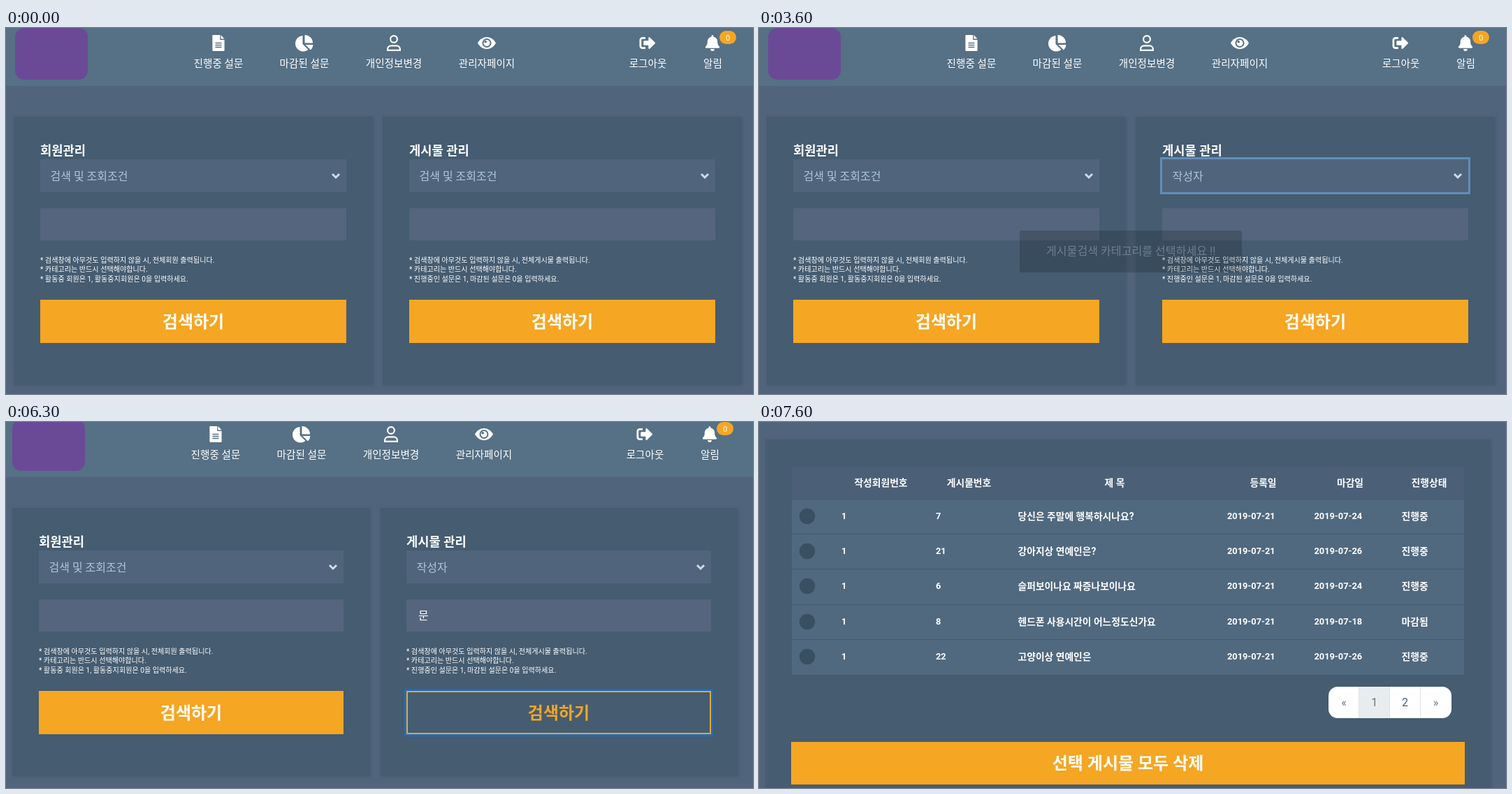
An HTML page for the animation above (8000 ms loop, 1069x524 px).

```html
<!DOCTYPE html>
<html lang="ko">
<head>
<meta charset="utf-8">
<style>
  html, body { margin: 0; width: 100%; height: 100%; overflow: hidden; background: #50647b; }
  svg { display: block; width: 1069px; height: 524px; }
  text { font-family: Roboto, 'Noto Sans CJK KR', 'Noto Sans CJK', sans-serif; white-space: pre; }
</style>
</head>
<body>
<svg id="stage" viewBox="0 0 1069 524"></svg>
<script>
const LOOP = 8000, STEP = 100;
const ORANGE = '#f5a623', PANEL = '#455c71', HEADER = '#567085', FIELD = '#50657b';
const stage = document.getElementById('stage');

const ramp = (t, from, to) => Math.min(1, Math.max(0, (t - from) / (to - from)));
const swing = (t, from, to) => 0.5 - Math.cos(Math.PI * ramp(t, from, to)) / 2;
const within = (t, from, to) => t >= from && t < to;

// Linear interpolation through [time, value] pairs
function track(t, keys) {
  let value = keys[0][1];
  for (let i = 1; i < keys.length; i++) {
    const [t0, v0] = keys[i - 1], [t1, v1] = keys[i];
    if (t >= t0) value = v0 + (v1 - v0) * ramp(t, t0, t1);
  }
  return value;
}

const scrollKeys = [[6200, 0], [6300, 4], [6400, 44], [6500, 124], [6700, 308], [6800, 374],
  [6900, 412], [7000, 424], [7100, 424], [7200, 429], [7300, 458], [7400, 498], [7500, 522], [7600, 530]];

const rect = (x, y, w, h, fill, extra = '') =>
  `<rect x="${x}" y="${y}" width="${w}" height="${h}" fill="${fill}" ${extra}/>`;
const path = (d, extra = 'fill="#fff"') => `<path d="${d}" ${extra}/>`;
const line = (d, width, color = '#fff') => path(d, `fill="none" stroke="${color}" stroke-width="${width}"`);
const circle = (x, y, r, fill) => `<circle cx="${x}" cy="${y}" r="${r}" fill="${fill}"/>`;
const ring = (x, y, w, h, color, alpha) =>
  rect(x - 1.5, y - 1.5, w + 3, h + 3, 'none', `stroke="${color}" stroke-width="3" opacity="${alpha}"`);

// y is the vertical middle of the line; baselines sit on whole pixels
function text(str, x, y, size, { fill = '#fff', bold = false, anchor = 'start', alpha = 1 } = {}) {
  return `<text x="${x}" y="${Math.round(y + size * 0.37)}" font-size="${size}" fill="${fill}"
    font-weight="${bold ? 700 : 400}" text-anchor="${anchor}" opacity="${alpha}">${str}</text>`;
}
const centered = (str, x, y, size, opts) => text(str, x, y, size, { anchor: 'middle', ...opts });

const navItems = [['진행중 설문', 304], ['마감된 설문', 427], ['개인정보변경', 555],
  ['관리자페이지', 688], ['로그아웃', 918.5], ['알림', 1011.5]];

const icons =
  path('M296.4 10h9.8v7h6.4v15a1 1 0 0 1-1 1h-15.2a1 1 0 0 1-1-1v-21a1 1 0 0 1 1-1zM307.4 10l5.2 5.6h-5.2z') +
  line('M299.5 21.5h9M299.5 24.5h9M299.5 27.5h9', 1.4, HEADER) +
  path('M424.5 11v12l8 8a11.3 11.3 0 1 1-8-20zM427.5 10a11.5 11.5 0 0 1 11.5 11.5h-11.5zM428.5 24h11a11.5 11.5 0 0 1-3.5 7.5z') +
  line('M546.1 31.9v-1.5a5 5 0 0 1 5-5h7.8a5 5 0 0 1 5 5v1.5z', 2.2) +
  '<circle cx="555" cy="16" r="4.9" fill="none" stroke="#fff" stroke-width="2.2"/>' +
  path('M675 21.5c6-11.5 20-11.5 26 0c-6 11.5-20 11.5-26 0z') +
  circle(688, 21.5, 6.5, HEADER) + circle(688, 21.5, 4.5, '#fff') + circle(686.2, 19.7, 1.8, HEADER) +
  line('M915 14.3h-4.2a2.9 2.9 0 0 0-2.9 2.9v8.6a2.9 2.9 0 0 0 2.9 2.9h4.2', 2.8) +
  path('M913.3 18.3h6.1v-4.3a1.1 1.1 0 0 1 1.8-.8l7.6 7.5a1.1 1.1 0 0 1 0 1.6l-7.6 7.5a1.1 1.1 0 0 1-1.8-.8v-4.3h-6.1a1 1 0 0 1-1-1v-4.4a1 1 0 0 1 1-1z') +
  path('M1011 10a1.4 1.4 0 0 0-1.4 1.4v1c-3.3.7-5.8 3.5-5.8 7 0 4.6-1.6 6-2.5 6.9a1.4 1.4 0 0 0 1.1 2.4h17.2a1.4 1.4 0 0 0 1.1-2.4c-.9-.9-2.5-2.3-2.5-6.9 0-3.5-2.4-6.3-5.8-7v-1a1.4 1.4 0 0 0-1.4-1.4zM1008.1 30.1h5.8a2.9 2.9 0 0 1-5.8 0z');

function header(dx) {
  return rect(0, -10, 1069, 93, HEADER) + `<g transform="translate(${dx} 0)">` +
    rect(13, 0, 104, 74, '#6a4a97', 'rx="13"') + icons +
    navItems.map(([label, x]) => centered(label, x, 50.5, 14.6)).join('') +
    rect(1021, 4, 24, 19, ORANGE, 'rx="9.5"') + centered('0', 1033, 14, 11) + '</g>';
}

function panel(x, y, w, h) {
  return rect(x, y, w, h, PANEL, 'style="filter:drop-shadow(1px 1px 2px #455c71)"');
}

function button(x, y, w, h, label, hover = 0) {
  const mid = x + w / 2, at = y + h / 2;
  return rect(x, y, w, h, ORANGE, `opacity="${1 - hover}"`) +
    rect(x + 1, y + 1, w - 2, h - 2, 'none', `stroke="${ORANGE}" stroke-width="2"`) +
    centered(label, mid, at, 24, { bold: true, alpha: 1 - hover }) +
    (hover ? centered(label, mid, at, 24, { bold: true, fill: ORANGE, alpha: hover }) : '');
}

function form({ px, pw, x, w }, title, choice, notes, hover) {
  return panel(px, 127, pw, 384) +
    text(title, x, 175, 17.7, { bold: true }) +
    rect(x, 188, w, 47, FIELD) + text(choice, x + 14.5, 212, 16, { fill: '#acc6de' }) +
    line(`M${x + w - 20} 209l5 5l5-5`, 3, '#cddbe8') +
    rect(x, 258, w, 46, '#54657d') +
    notes.map((note, i) => text(note, x, 332 + i * 13.6, 10.1)).join('') +
    button(x, 389, w, 62, '검색하기', hover);
}

const layouts = {
  wide: { dx: 0, left: { px: 11, pw: 514, x: 49, w: 438 }, right: { px: 539, pw: 514, x: 577, w: 438 } },
  narrow: { dx: -4, left: { px: 9, pw: 512, x: 47, w: 436 }, right: { px: 536, pw: 511, x: 573, w: 436 } }
};
const hint = '* 카테고리는 반드시 선택해야합니다.';
const memberNotes = ['* 검색창에 아무것도 입력하지 않을 시, 전체회원 출력됩니다.', hint,
  '* 활동중 회원은 1, 활동중지회원은 0을 입력하세요.'];
const postNotes = ['* 검색창에 아무것도 입력하지 않을 시, 전체게시물 출력됩니다.', hint,
  '* 진행중인 설문은 1, 마감된 설문은 0을 입력하세요.'];
const options = ['검색 및 조회조건', '작성자', '제목', '진행상태'];

function entry(t, { x, w }) {
  const focus = ramp(t, 3600, 3800) - ramp(t, 5600, 5800);
  let out = '';
  if (focus > 0) {
    out += rect(x - 1, 257, w + 2, 48, '#5f738f', `stroke="#7d93b0" stroke-width="2" opacity="${focus}"`);
  }
  const typed = t < 4100 ? '' : t < 4200 ? 'ㅁ' : t < 4400 ? '무' : '문';
  out += text(typed, x + 17, 281, 16);
  if (within(t, 4100, 4700)) out += rect(x + 17, 290, 14, 1, '#fff');
  if (within(t, 3800, 4100)) out += rect(x + 17, 272, 1, 19, '#fff');
  if (within(t, 5200, 5700)) out += rect(x + 30, 272, 1, 19, '#fff');
  return out;
}

function dropdown(t, { x, w }) {
  if (!within(t, 2600, 3300)) return '';
  const active = t < 3100 ? 0 : 1;
  return rect(x, 235, w, options.length * 20.5, FIELD) +
    rect(x, 235 + active * 20.5, w, 20.5, '#1e90ff') +
    options.map((label, i) => text(label, x + 4, 245.5 + i * 20.5, 16,
      { fill: i === active ? '#fff' : '#acc6de' })).join('');
}

function toast(t) {
  const alpha = swing(t, 1550, 2050) - swing(t, 3250, 3750);
  if (alpha <= 0) return '';
  return `<g opacity="${alpha}">` + rect(373, 290, 318, 60, '#030303', 'rx="3" opacity=".8"') +
    text('게시물검색 카테고리를 선택하세요 !!', 411, 319, 16.1) + '</g>';
}

const heads = [['작성회원번호', 174.5], ['게시물번호', 300.5], ['제 목', 509],
  ['등록일', 721.5], ['마감일', 846], ['진행상태', 959]];
const posts = [
  ['7', '당신은 주말에 행복하시나요?', '24', '진행중'],
  ['21', '강아지상 연예인은?', '26', '진행중'],
  ['6', '슬퍼보이나요 짜증나보이나요', '24', '진행중'],
  ['8', '헨드폰 사용시간이 어느정도신가요', '18', '마감됨'],
  ['22', '고양이상 연예인은', '26', '진행중']
];

function results() {
  const bold = { bold: true };
  let out = panel(9, 555, 1038, 560) + rect(47, 594, 962, 46, '#4b6077') +
    heads.map(([label, x]) => centered(label, x, 616.5, 13.8, bold)).join('');
  posts.forEach(([id, title, day, state], i) => {
    const top = Math.round(640 + i * 50.2), y = top + 24.5;
    out += rect(47, top, 962, 51, '#50697f') + rect(47, top, 962, 1, '#415a6e') +
      circle(69, y + 0.5, 11.2, '#394f62') +
      text('1', 118, y, 12.8, bold) + text(id, 253, y, 12.8, bold) + text(title, 370.5, y, 13.8, bold) +
      text('2019-07-21', 670, y, 12.8, bold) + text('2019-07-' + day, 794.5, y, 12.8, bold) +
      text(state, 919.5, y, 13.8, bold);
  });
  out += rect(815, 909, 176, 45, '#fff', 'rx="13"') + rect(858, 909, 45, 45, '#e9ecef') +
    line('M858.5 909v45M902.5 909v45M946.5 909v45', 1, '#dee2e6');
  ['«', '1', '2', '»'].forEach((label, i) => {
    out += centered(label, 837 + i * 43.8, 931, 16, { fill: label === '2' ? '#435c70' : '#6c757d' });
  });
  return out + button(46, 988, 964, 61, '선택 게시물 모두 삭제');
}

function scene(t) {
  const { dx, left, right } = t < 6100 ? layouts.wide : layouts.narrow;
  const hover = ramp(t, 950, 1250) - ramp(t, 1850, 2150) + ramp(t, 5350, 5600);
  const buttonRing = ramp(t, 1300, 1500) - ramp(t, 2400, 2600) + ramp(t, 5600, 5800);
  const selectRing = ramp(t, 2400, 2600) - ramp(t, 3600, 3800);
  const choice = options[t < 3300 ? 0 : 1];
  return rect(0, 0, 1069, 524, '#50647b') +
    `<g transform="translate(0 ${-Math.round(track(t, scrollKeys))})">` + header(dx) +
    form(left, '회원관리', options[0], memberNotes, 0) +
    form(right, '게시물 관리', choice, postNotes, hover) +
    ring(right.x, 389, right.w, 62, '#007bff', buttonRing * 0.55) +
    ring(right.x, 188, right.w, 47, '#80bdff', selectRing * 0.5) +
    entry(t, right) + (t < 6100 ? '' : results()) + '</g>' +
    toast(t) + dropdown(t, right);
}

let shown = -1;
function tick() {
  const t = Math.floor(performance.now() % LOOP / STEP) * STEP;
  if (t !== shown) stage.innerHTML = scene(shown = t);
  requestAnimationFrame(tick);
}
tick();
</script>
</body>
</html>
```
